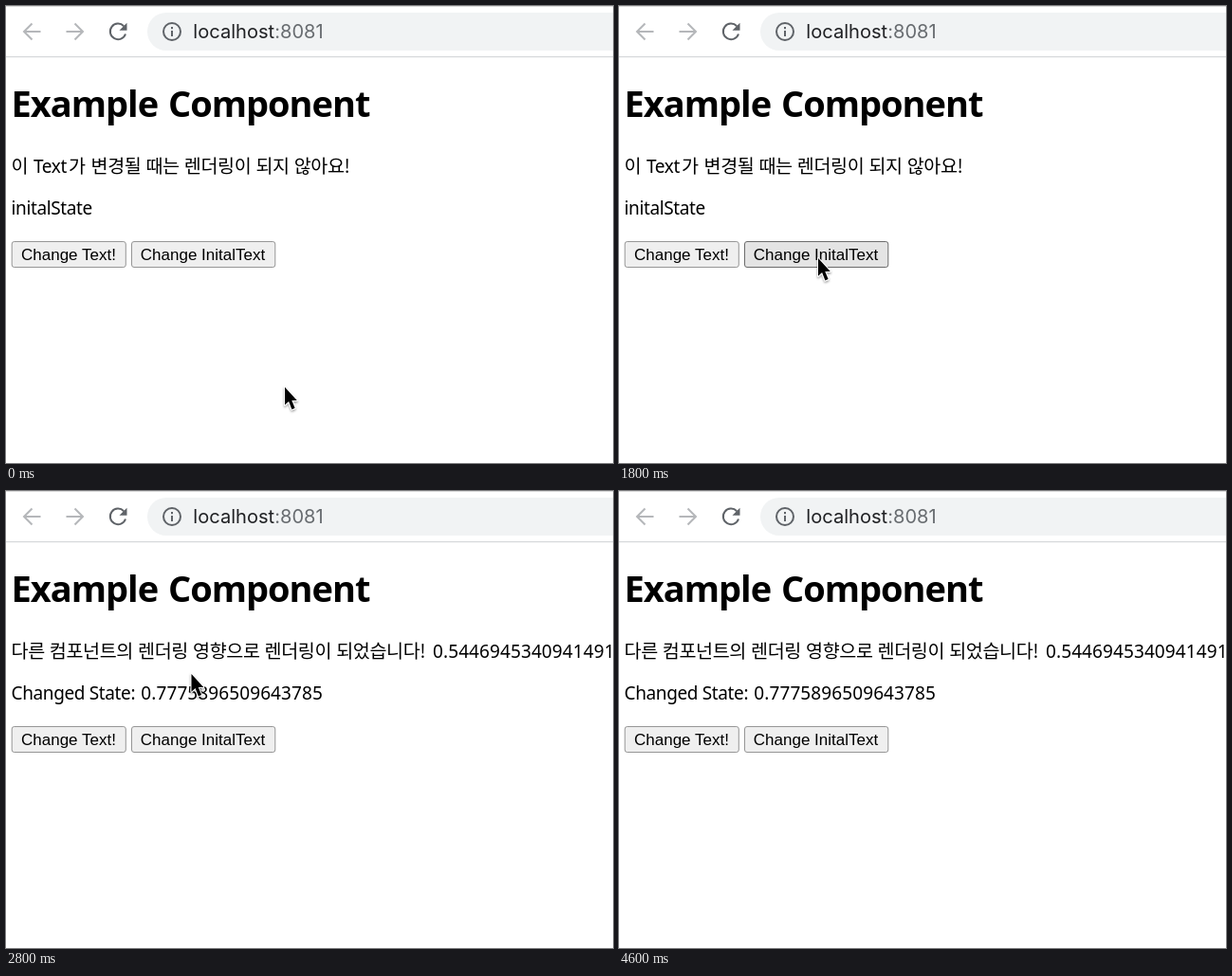
An HTML page for the animation above (5210 ms loop, 640x482 px).

```html
<!DOCTYPE html>
<html lang="ko">
<head>
<meta charset="utf-8">
<title>Example Component</title>
<style>
  html, body { margin: 0; width: 100%; height: 100%; overflow: hidden; background: #fff; }
  svg { display: block; width: 100vw; height: 100vh; }
  text { white-space: pre; }
  .h1 { font: bold 38px "Noto Sans", sans-serif; letter-spacing: -1px; }
  .ko { font: 19.6px "Noto Sans CJK KR", "Noto Sans CJK", sans-serif; letter-spacing: -.4px; }
  .la { font: 19px "Noto Sans", sans-serif; letter-spacing: -.37px; }
  .num { letter-spacing: .1px; }
  .btn { font: 17px "Liberation Sans", Arial, sans-serif; }
  .url { font: 20.1px Inter, sans-serif; fill: #202124; }
  .icon { fill: none; stroke: #5f6368; stroke-width: 2; }
  .off { stroke: #b5b7ba; }
</style>
</head>
<body>
<svg viewBox="0 0 640 482">
  <defs>
    <filter id="soft" x="-60%" y="-30%" width="220%" height="170%">
      <feDropShadow dx="0" dy="1.5" stdDeviation="1.3" flood-opacity=".4"/>
    </filter>
    <path id="beamShape" d="M-4.500 -10.500Q0 -10.500 0 -7.500Q0 -10.500 4.500 -10.500M0 -7.500V7.500M-4.500 10.500Q0 10.500 0 7.500Q0 10.500 4.500 10.500M-2.500 1H2.500"/>
  </defs>
  <rect width="640" height="482" fill="#fff"/>

  <g id="toolbar">
    <rect width="640" height="1" fill="#dcdcdc"/>
    <rect y="53" width="640" height="1.2" fill="#d6d8da"/>
    <rect x="149" y="7" width="540" height="40" rx="20" fill="#f1f3f4"/>
    <path class="icon off" d="M36.500 27H19.500M27.500 18.500L19 27L27.500 35.500"/>
    <path class="icon off" d="M63.500 27H80.500M72.500 18.500L81 27L72.500 35.500"/>
    <path class="icon" d="M124.200 21.200A8.300 8.300 0 1 0 126 29.500"/>
    <path d="M127.500 17.800V25.800H119.500Z" fill="#5f6368"/>
    <circle class="icon" cx="175" cy="27" r="9"/>
    <path class="icon" d="M175 26V32M175 22V24.200"/>
    <text class="url" x="197.300" y="34">localhost<tspan fill="#686c70">:8081</tspan></text>
  </g>

  <text class="h1" x="5.500" y="117">Example<tspan x="171">Component</tspan></text>

  <g id="before">
    <text class="ko" y="175.500"><tspan x="5.500">이</tspan><tspan class="la" x="29">Text</tspan><tspan x="66">가</tspan><tspan x="89.500">변경될 때는 렌더링이 되지 않아요!</tspan></text>
    <text class="la" x="5.500" y="220">initalState</text>
  </g>
  <g id="after">
    <text class="ko" x="5.500" y="175.500">다른 컴포넌트의 렌더링 영향으로 렌더링이 되었습니다!<tspan class="la num" x="450">0.5446945340941491</tspan></text>
    <text class="la" x="5.500" y="220">Changed State:<tspan class="num" x="142.300">0.7775896509643785</tspan></text>
  </g>

  <g id="buttons">
    <rect x="6.200" y="248.500" width="120.100" height="27" rx="2.500"/>
    <rect x="132.500" y="248.500" width="151.300" height="27" rx="2.500"/>
  </g>
  <text class="btn" x="16" y="267.500">Change Text!</text>
  <text class="btn" x="141.800" y="267.500">Change InitalText</text>

  <g id="cursor">
    <path id="arrow" filter="url(#soft)" stroke="#fff" stroke-width="2" paint-order="stroke" stroke-linejoin="round"
      d="M0 0V18.800L4.100 15L7.400 23.400L10.600 22L7.300 13.900H12.800Z"/>
    <g id="beam" fill="none" stroke-linecap="round">
      <use href="#beamShape" stroke="#fff" stroke-width="4"/>
      <use href="#beamShape" stroke="#111" stroke-width="1.700"/>
    </g>
  </g>
</svg>
<script>
  const LOOP = 5210, STEP = 100;
  const TEXT_AT = 2400, HIDE_AT = 4100;
  const $ = id => document.getElementById(id);
  const show = (id, on) => $(id).setAttribute('display', on ? 'inline' : 'none');

  // pointer moves: first step, last step, destination
  const start = [294, 402];
  const moves = [
    [100, 500, 210, 266],
    [2000, 2200, 88, 257],
    [2600, 3100, 303, 129],
    [3200, 3300, 402, 233],
    [3600, 3900, 138, 70],
    [4000, 4000, 133, 75]
  ];
  const presses = [[1200, 1300], [1400, 1800], [2300, 2400]];

  const buttons = [...$('buttons').children];
  const boxes = [[6, 248, 127, 276], [132, 248, 284, 276]];
  const looks = {
    rest: ['#efefef', '#969696'],
    hover: ['#e4e4e4', '#6c6c6c'],
    press: ['#f5f5f5', '#a4a4a4']
  };

  const inside = ([x, y], [l, t, r, b]) => x >= l && x <= r && y >= t && y <= b;
  const ease = p => p * p * (3 - 2 * p);

  function pointerAt(t) {
    let pos = start;
    for (const [from, to, x, y] of moves) {
      if (t < from) break;
      const k = ease(Math.min(1, (t - from + STEP) / (to - from + STEP)));
      pos = [pos[0] + (x - pos[0]) * k, pos[1] + (y - pos[1]) * k];
    }
    return pos;
  }

  function draw(ms) {
    const t = Math.floor(ms / STEP) * STEP;
    const pos = pointerAt(t);
    const changed = t >= TEXT_AT;
    const visible = t < HIDE_AT;
    const pressed = presses.some(([a, b]) => t >= a && t < b);
    const lines = [
      [6, 83, 384, 131],
      [6, 156, changed ? 640 : 365, 182],
      [6, 201, changed ? 334 : 92, 227]
    ];
    const overText = lines.some(box => inside(pos, box));

    show('before', !changed);
    show('after', changed);
    show('cursor', visible);
    show('arrow', !overText);
    show('beam', overText);
    $('cursor').setAttribute('transform', `translate(${pos})`);

    buttons.forEach((el, i) => {
      const over = visible && inside(pos, boxes[i]);
      const [fill, stroke] = looks[over ? (pressed ? 'press' : 'hover') : 'rest'];
      el.setAttribute('fill', fill);
      el.setAttribute('stroke', stroke);
    });
  }

  const t0 = performance.now();
  function tick() {
    draw((performance.now() - t0) % LOOP);
    requestAnimationFrame(tick);
  }
  tick();
</script>
</body>
</html>
```
